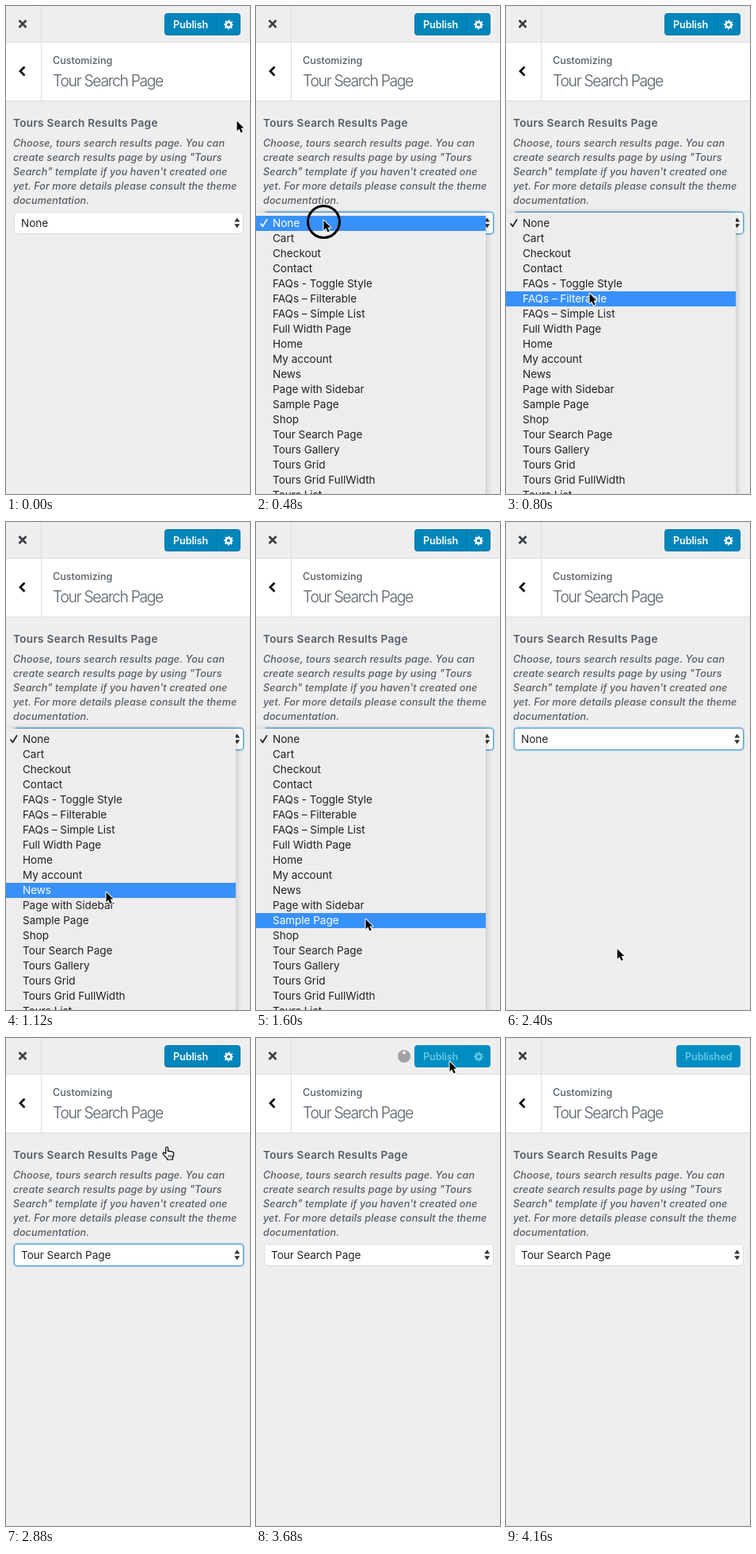
Recreate the animation shown at these times as an HTML page. Size 308 by 614 pixels, loop 4.48 s.

```html
<!DOCTYPE html>
<html lang="en">
<head>
<meta charset="utf-8">
<title>Tour Search Page</title>
<style>
  html, body { margin: 0; width: 100%; height: 100%; overflow: hidden; background: #eee; }
  svg { display: block; width: 100%; height: 100%; font-family: Inter, Roboto, sans-serif; }
  .line { fill: #ddd; }
  .grey { fill: #555d66; }
  .small { font-size: 12.6px; font-weight: 500; }
  .title { font-size: 19.4px; font-weight: 300; letter-spacing: -1.35px; }
  .label { font-size: 13.6px; font-weight: 600; letter-spacing: .3px; }
  .help { font-size: 12.6px; font-weight: 500; font-style: italic; letter-spacing: .1px; }
  .option { font-size: 13.6px; letter-spacing: -.06px; fill: #222; }
  .button { font-size: 12.6px; font-weight: 600; letter-spacing: -.1px; }
  #select { fill: #fff; stroke: #ddd; }
  #select.focus { stroke: #5b9dd9; filter: drop-shadow(0 0 1px #1e8cbe); }
  #menu { filter: drop-shadow(0 2px 4px rgba(0, 0, 0, .25)); }
  #menu text.on { fill: #fff; }
  #check.on { stroke: #fff; }
  #publish { --face: #0085ba; --edge: #0073aa; --ink: #fff; }
  #publish.pressed { --press: #0073aa; }
  #publish.disabled, #published { --face: #008ec2; --edge: #0083b8; --ink: #66c6e4; }
  .face { fill: var(--face); stroke: var(--edge); }
  .ink { fill: var(--ink); }
</style>
</head>
<body>
<svg viewBox="0 0 308 614" preserveAspectRatio="none">
  <rect width="308" height="614" fill="#eee"/>
  <rect y="46" width="308" height="73" fill="#fff"/>
  <rect class="line" y="45" width="308" height="1"/>
  <rect class="line" y="119" width="308" height="1"/>
  <rect class="line" x="44" width="1" height="119"/>
  <path d="M16.500 18l9 9m0-9l-9 9" fill="none" stroke="#3c4045" stroke-width="2.600"/>
  <path d="M23.500 76.500L18 82l5.500 5.500" fill="none" stroke="#111" stroke-width="2.800"/>

  <text class="grey small" x="59" y="73">Customizing</text>
  <text class="grey title" x="59" y="101">Tour Search Page</text>
  <text class="grey label" x="9" y="152">Tours Search Results Page</text>
  <g id="help" class="grey help"></g>

  <g id="publish">
    <rect class="face" x="200.500" y="9.500" width="95" height="27" rx="3"/>
    <path d="M203.500 10H265v26h-61.500q-2.500 0-2.500-2.500v-21q0-2.500 2.500-2.500z" fill="var(--press, none)"/>
    <path d="M265.500 10v26" stroke="var(--edge)"/>
    <text class="ink button" x="211" y="28">Publish</text>
    <g fill="none" stroke="var(--ink)">
      <circle cx="281" cy="23.500" r="3.300" stroke-width="2.400"/>
      <circle cx="281" cy="23.500" r="5" stroke-width="2" stroke-dasharray="1.963" stroke-dashoffset=".98"/>
    </g>
  </g>
  <g id="published">
    <rect class="face" x="215.500" y="9.500" width="80" height="27" rx="3"/>
    <text class="ink button" x="226" y="28">Published</text>
  </g>
  <g id="spinner">
    <circle cx="187" cy="23" r="8" fill="#a3a3a3"/>
    <circle cx="187" cy="18.500" r="2" fill="#eee"/>
  </g>

  <rect id="select" x="10.500" y="259.500" width="289" height="27" rx="3.500"/>
  <path d="M288.200 271.500l3.500-5 3.500 5zm0 2.800l3.500 5 3.500-5z" fill="#333"/>
  <text id="value" class="option" x="19" y="278"></text>

  <g id="menu">
    <path d="M0 260H286q4 0 4 4V620H0z" fill="#ededed"/>
    <rect id="highlight" width="290" height="19" fill="#3891fb"/>
    <path id="check" d="M5.500 273.500l3 3.800 5.500-9" fill="none" stroke="#222" stroke-width="1.700"/>
  </g>

  <circle id="ring" r="20" fill="none" stroke="#000" stroke-width="3"/>
  <path id="arrow" d="M1.500 1.800V14.200L4.300 11.500 6.500 16.500 8.700 15.500 6.600 10.600H10.300z"
        stroke="#fff" stroke-width="2" stroke-linejoin="round" paint-order="stroke"/>
  <g id="hand">
    <path d="M4.700 9.500V2.400a1.400 1.400 0 0 1 2.800 0V6.600q1.200-1 2.500.3 1.400-.9 2.400.5 2.100-.5 2.300 1.400V11q0 2-1.300 3.700V17H6.500V15.600Q4.200 13.500 1.200 9.800 .8 8 2.500 8z"
          fill="#fff" stroke="#000" stroke-width="1.200" stroke-linejoin="round"/>
    <path d="M8.300 11v3.300m2.100-3.300v3.300m2.100-3.300v3.300" stroke="#000" stroke-width=".8"/>
  </g>
</svg>
<script>
const LOOP = 4480, MENU_TOP = 264, ROW = 19;
const byId = id => document.getElementById(id);
const show = (id, visible) => { byId(id).style.display = visible ? '' : 'none'; };
const place = (id, x, y) => byId(id).setAttribute('transform', `translate(${x} ${y})`);

function addText(parent, x, y, content, className = '') {
  const node = document.createElementNS(parent.namespaceURI, 'text');
  node.setAttribute('x', x);
  node.setAttribute('y', y);
  node.setAttribute('class', className);
  node.textContent = content;
  return parent.appendChild(node);
}

[
  'Choose, tours search results page. You can',
  'create search results page by using "Tours',
  'Search" template if you haven\'t created one',
  'yet. For more details please consult the theme',
  'documentation.'
].forEach((line, i) => addText(byId('help'), 9, 177 + 18 * i, line));

const options = [
  'None', 'Cart', 'Checkout', 'Contact', 'FAQs - Toggle Style', 'FAQs – Filterable',
  'FAQs – Simple List', 'Full Width Page', 'Home', 'My account', 'News',
  'Page with Sidebar', 'Sample Page', 'Shop', 'Tour Search Page', 'Tours Gallery',
  'Tours Grid', 'Tours Grid FullWidth', 'Tours List'
].map((name, i) => addText(byId('menu'), 21, MENU_TOP + 14 + ROW * i, name, 'option'));

// Pointer stops: time, x, y, shape
const stops = [
  [0, 290, 143], [160, 63, 384], [320, 84, 268],
  [640, 92, 300], [800, 104, 360], [960, 116, 425], [1120, 125, 464],
  [1280, 129, 476], [1440, 133, 484], [1600, 137, 498], [1760, 136, 505],
  [1920, 138, 519], [2080, 139, 535.5], [2560, 150, 437], [2720, 175, 251],
  [2880, 197, 136, 'hand'], [3040, 218, 58], [3200, 218, 34, 'hand'],
  [3360, 238, 28, 'hand'], [3680, 243, 28], [4000, 281, 32], [4160, 0, 0, 'none']
];

function render(t) {
  const within = (from, to) => t >= from && t < to;
  const [, x, y, shape = 'arrow'] = stops.findLast(stop => stop[0] <= t);
  for (const id of ['arrow', 'hand']) {
    show(id, shape === id);
    place(id, x, y);
  }

  const menuOpen = within(480, 2400);
  show('menu', menuOpen);
  if (menuOpen) {
    const row = Math.floor((y - MENU_TOP) / ROW);
    byId('highlight').setAttribute('y', MENU_TOP + ROW * row);
    options.forEach((node, i) => node.classList.toggle('on', i === row));
    byId('check').classList.toggle('on', row === 0);
  }
  byId('value').textContent = t < 2560 ? 'None' : 'Tour Search Page';
  byId('select').classList.toggle('focus', within(320, 3680));

  const pressed = within(3360, 3680);
  show('ring', pressed || within(480, 640));
  if (pressed) place('ring', 244, 31);
  else place('ring', 85.5, 271.5);

  const saving = within(3680, 3840);
  byId('publish').classList.toggle('pressed', pressed);
  byId('publish').classList.toggle('disabled', saving);
  show('publish', t < 3840);
  show('published', t >= 3840);
  show('spinner', saving);
}

const start = performance.now();
function tick() {
  render((performance.now() - start) % LOOP);
  requestAnimationFrame(tick);
}
tick();
</script>
</body>
</html>
```
